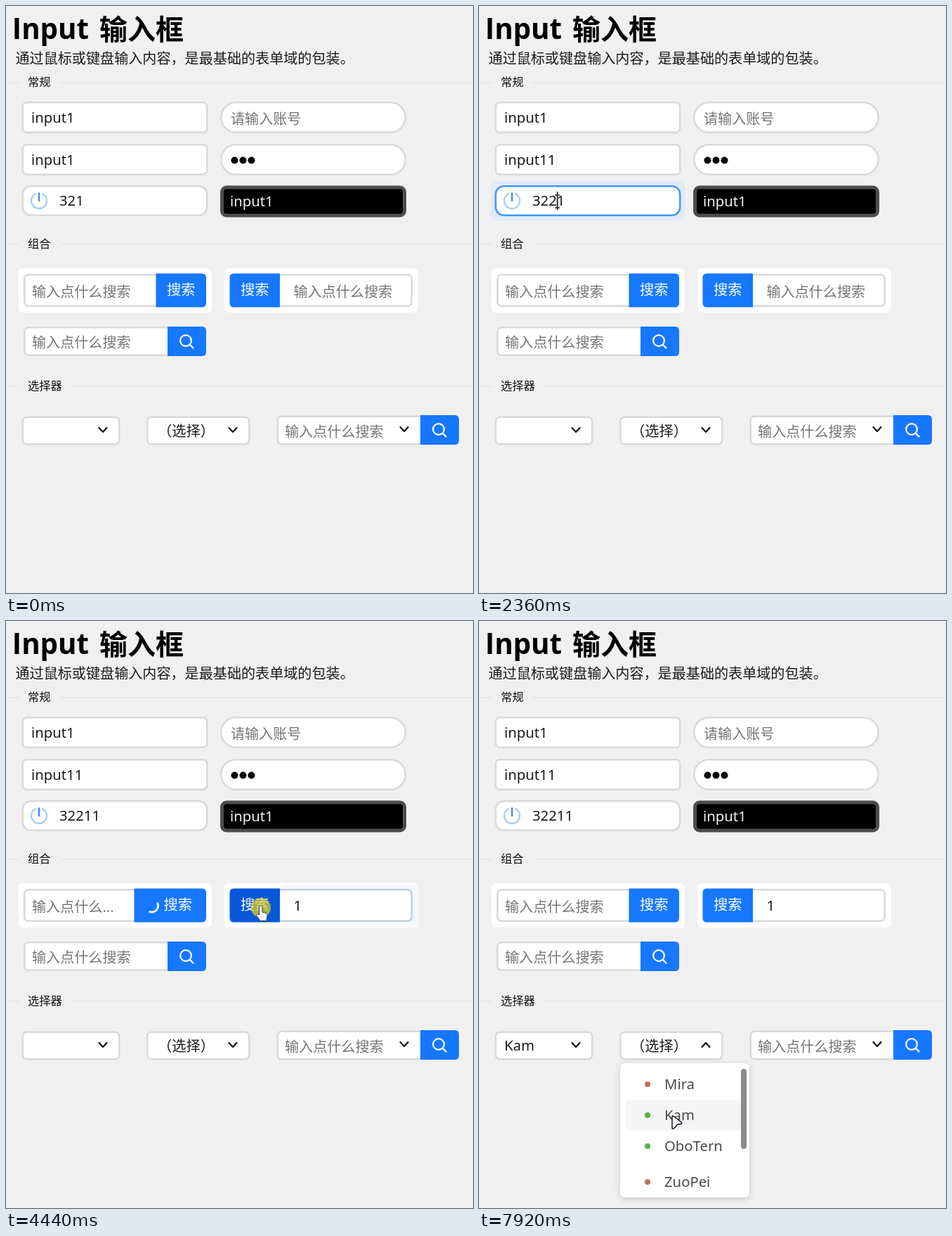
Animation of 665 by 835 pixels, one loop 8 s. Source, as an HTML page:

```html
<!DOCTYPE html>
<html lang="zh">
<head>
<meta charset="utf-8">
<style>
  html, body { margin: 0; height: 100%; overflow: hidden; background: #f0f0f0; }
  svg { display: block; width: 665px; height: 835px; }
  text { font-family: "Noto Sans", "Noto Sans CJK SC", "Noto Sans CJK", sans-serif; white-space: pre; }
  .title { font-family: "Open Sans", "Noto Sans CJK SC", "Noto Sans CJK", sans-serif; font-weight: 700; }
</style>
</head>
<body>
<svg id="stage" viewBox="0 0 665 835"></svg>
<script>
const LOOP = 8000, BLUE = '#1677ff', SKY = '#4096ff', GREY = '#d9d9d9', HINT = '输入点什么搜索';
const FIRST = 'Kam', NAMES = ['Mira', FIRST, 'OboTern', 'ZuoPei'], ROWS = [658, 702, 746, 797];
const stage = document.getElementById('stage');
const ruler = document.createElement('canvas').getContext('2d');
ruler.font = '20.3px "Noto Sans", sans-serif';

const clamp = v => Math.max(0, Math.min(1, v));
const ease = v => { v = clamp(v); return v * v * (3 - 2 * v); };
const mix = (a, b, k) => `color-mix(in srgb, ${b} ${(k * 100).toFixed(1)}%, ${a})`;
const pulse = (t, from, to, fade = 200) => clamp((t - from) / fade) * (1 - clamp((t - to) / fade));
const latest = (t, steps) => steps.filter(s => s[0] <= t).pop()[1];

// Pointer stops: time, x, y
const PATH = [
  [80, 300, 425], [560, 257, 155], [820, 400, 160], [1000, 400, 218], [1150, 390, 280],
  [1280, 230, 272], [1420, 182, 217], [1640, 160, 233], [1880, 150, 262], [2080, 110, 278],
  [2480, 112, 278], [2660, 369, 280], [2720, 369, 280], [2880, 184, 376], [2960, 182, 378],
  [3160, 250, 406], [3360, 252, 408], [3680, 450, 410], [3960, 448, 416], [4320, 363, 407],
  [4520, 363, 407], [5000, 130, 478], [5080, 130, 480], [5240, 134, 508], [5520, 140, 560],
  [5800, 96, 603], [6000, 95, 605], [6320, 89, 697], [6740, 89, 697], [7160, 290, 603],
  [7320, 289, 606], [7760, 270, 686], [7920, 275, 704]
];
const CLICKS = [1420, 2080, 2660, 3160, 3700, 4370, 5040, 5940, 6480, 7240];

function pointer(t) {
  const i = PATH.findIndex(p => p[0] > t);
  if (i === 0) return [-99, -99];
  if (i < 0) return PATH[PATH.length - 1].slice(1);
  const [t0, x0, y0] = PATH[i - 1], [t1, x1, y1] = PATH[i], k = ease((t - t0) / (t1 - t0));
  return [x0 + (x1 - x0) * k, y0 + (y1 - y0) * k];
}
const inside = ([px, py], [x, y, w, h], pad = 0) =>
  px >= x - pad && px <= x + w + pad && py >= y - pad && py <= y + h + pad;

// Share of the last 200 ms spent over the box, which gives the hover fade
function hover(t, box, pad = 0) {
  let hits = 0;
  for (let i = 0; i < 10; i++) hits += inside(pointer(t - i * 20), box, pad);
  return hits / 10;
}

const text = (x, y, s, fill = '#1a1a1a', size = 20.3, extra = '') =>
  `<text x="${x}" y="${y}" fill="${fill}" font-size="${size}" ${extra}>${s}</text>`;
const rect = (x, y, w, h, r, fill, extra = '') =>
  `<rect x="${x}" y="${y}" width="${w}" height="${h}" rx="${r}" fill="${fill}" ${extra}/>`;
const line = (d, color, width) =>
  `<path d="${d}" fill="none" stroke="${color}" stroke-width="${width}" stroke-linecap="round" stroke-linejoin="round"/>`;

function section(y, label, end) {
  return rect(0, y - 1, 19, 2, 0, '#e8e8e8') + rect(end, y - 1, 665 - end, 2, 0, '#e8e8e8') +
    text(31, y + 5, label, '#111', 16.3);
}

function field(t, f) {
  const [x, y, w, h] = f.box, sw = f.border || 2.5;
  const focus = f.focus ? pulse(t, ...f.focus) : 0;
  const active = f.focus && t >= f.focus[0] && t < f.focus[1];
  const lit = Math.max(focus * focus, hover(t, f.hit || f.box, 6));
  const value = f.value || '';
  const glow = f.glow || [x - 5.5, w + 11];
  let out = focus ? rect(glow[0], y - 6, glow[1], h + 12, 7, '#e2eaf8', `opacity="${focus}"`) : '';
  out += rect(x + sw / 2, y + sw / 2, w - sw, h - sw, (f.r || 7) - sw / 2, f.fill || '#fff',
    `stroke="${mix(f.edge || GREY, SKY, lit)}" stroke-width="${sw}"`);
  if (value) out += text(f.x, y + h / 2 + 7, value, f.color);
  else if (f.hint && !active) out += text(f.x, y + h / 2 + 9, f.hint, '#757575', 20.1);
  if (active && (t - (f.typed || f.focus[0])) % 1060 < 530) {
    const before = value.slice(0, value.length - (f.tail || 0));
    out += rect(f.x + ruler.measureText(before).width, y + h / 2 - 13, 1.5, 26, 0, f.color || '#111');
  }
  return out;
}

function button(t, [x, y, w, h], side, press = 1e9) {
  const r = 6, e = x + w, b = y + h;
  const shape = side === 'left'
    ? `M${e} ${y}H${x + r}Q${x} ${y} ${x} ${y + r}V${b - r}Q${x} ${b} ${x + r} ${b}H${e}Z`
    : `M${x} ${y}H${e - r}Q${e} ${y} ${e} ${y + r}V${b - r}Q${e} ${b} ${e - r} ${b}H${x}Z`;
  const pressed = t >= press && t < press + 150;
  return `<path d="${shape}" fill="${pressed ? '#0958d9' : mix(BLUE, SKY, hover(t, [x, y, w, h]))}"/>`;
}

const magnifier = (x, y) => `<circle cx="${x - 1}" cy="${y - 1}" r="7.9" fill="none" stroke="#fff" stroke-width="2.2"/>` +
  line(`M${x + 5} ${y + 5}l4.500 4.500`, '#fff', 2.4);

const chevron = (x, y, open = 0) => {
  const d = 3 * (1 - 2 * open);
  return line(`M${x - 5.5} ${y - d}L${x} ${y + d}L${x + 5.5} ${y - d}`, '#151515', 2.3);
};

const spinner = (t, x, y, k) => k <= 0 ? '' :
  `<g transform="translate(${x} ${y}) rotate(${42 + (t - 4440) * 360 / 960})" opacity="${k}">` +
  line('M3.8 -8.2A9 9 0 0 1 3.8 8.2', '#fff', 2.8) + '</g>';

function popup(x, w, h, open, content) {
  if (open <= 0) return '';
  return `<g transform="translate(0 629) scale(1 ${0.8 + 0.2 * open}) translate(0 -629)" opacity="${open}">` +
    rect(x, 629, w, h, 7, '#fff', 'filter="url(#shadow)"') + content + '</g>';
}

function list(t, x, w, textX, dots) {
  const at = pointer(t);
  return NAMES.map((name, i) => {
    const y = ROWS[i], row = [x + 8, y - 21, w - 20, 44];
    return (inside(at, row) ? rect(...row, 6, '#f5f5f5') : '') +
      (dots ? `<circle cx="${x + 39}" cy="${y + 1}" r="4" fill="${i % 3 ? '#52b43c' : '#c0705a'}"/>` : '') +
      text(textX, y + 7.5, name, '#4a4a4a');
  }).join('') + rect(x + w - 12, 637, 8, 114, 4, '#8c8c8c');
}

function drawPointer(t, buttons, inputs) {
  const at = pointer(t), [x, y] = at;
  if (x < 0) return '';
  const clicked = CLICKS.some(c => t >= c && t < c + 150);
  let shape;
  if (buttons.some(b => inside(at, b)))
    shape = '<path d="M-2.5 11V0a2.2 2.2 0 0 1 4.4 0V7l5.2 1.4q2.4.7 2 3.5l-1.2 7.6h-8.6l-5.5-7q-1-2.8 3.7-1.5z" fill="#fff" stroke="#333" stroke-width="1"/>';
  else if (inputs.some(b => inside(at, b, -8)))
    shape = line('M-3 -9H3M0 -9V9M-3 9H3', '#222', 1.4);
  else
    shape = '<path d="M0 1.5Q0-1 2 .5L13 9q1.5 2-1 2.4l-4.5.9-4.5 5.2Q0 20 0 16.500Z" fill="#fff" stroke="#111827" stroke-width="1.5"/>';
  return (clicked ? `<circle cx="${x}" cy="${y + 1}" r="14" fill="#dccf24" opacity=".73"/>` : '') +
    `<g transform="translate(${x} ${y})">${shape}</g>`;
}

function draw(t) {
  const load1 = pulse(t, 3220, 5100, 120), load2 = pulse(t, 4520, 6420, 120);
  const open1 = pulse(t, 5960, 6690, 180), open2 = clamp((t - 7280) / 180);
  const flip1 = ease((t - 5960) / 180) - ease((t - 6590) / 180);
  const left1 = 213.5 - 31 * load1, right2 = 390 + 31 * load2;
  const picked = t >= 6500;

  const go1 = [left1, 380.5, 285 - left1, 48], go2 = [318.5, 380.5, right2 - 318.5, 48];
  const go3 = [230, 456, 55, 42], go4 = [590, 582, 55, 42];

  const plain = [
    { box: [22.5, 136, 265, 45], x: 36, value: 'input1' },
    { box: [305, 136, 265, 45], r: 22.5, x: 320, hint: '请输入账号' },
    { box: [22.5, 196, 265, 45], x: 36, value: latest(t, [[0, 'input1'], [1900, 'input11']]), focus: [1420, 2080] },
    { box: [305, 196, 265, 45], r: 22.5 },
    { box: [22.5, 255, 265, 44], r: 13, x: 76, tail: 1, focus: [2080, 2660],
      value: latest(t, [[0, '321'], [2280, '3221'], [2440, '32211']]) },
    { box: [305, 255.5, 265, 45], r: 9, x: 319, value: 'input1', tail: 1, focus: [2660, 3160],
      border: 5, fill: '#000', edge: '#4d4d4d', color: '#f2f2f2' }
  ];
  const combo1 = { box: [25, 381, 250, 47], hit: [25, 381, left1 - 25, 47], x: 37,
    hint: load1 > 0.5 ? '输入点什么...' : HINT };
  const combo2 = { box: [375, 381, 204, 47], hit: [right2 + 6, 381, 573 - right2, 47], x: 409.5 + 31 * load2,
    hint: HINT, value: t >= 3960 ? '1' : '', focus: [3700, 4320], glow: [right2, 587 - right2] };
  const combo3 = { box: [25, 456, 230, 42], hit: [25, 456, 205, 42], x: 37, hint: HINT,
    focus: [5040, 5940], glow: [18, 212] };
  const select1 = { box: [22.5, 583.5, 140, 41], x: 36, value: picked ? FIRST : '', focus: [5940, 7240],
    typed: picked ? 6500 : 5940 };
  const select2 = { box: [200, 583.5, 147.5, 41] };
  const select3 = { box: [385.5, 582.5, 225, 42], hit: [385.5, 582.5, 204, 42], x: 397, hint: HINT };

  const inputs = [...plain, combo1, combo2, combo3, select1].map(f => f.hit || f.box);

  stage.innerHTML = `<defs><filter id="shadow" x="-20%" y="-20%" width="140%" height="140%">
      <feDropShadow dx="0" dy="2" stdDeviation="4" flood-opacity=".17"/></filter></defs>` +
    rect(0, 0, 665, 835, 0, '#f0f0f0') +
    text(8.8, 47, 'Input', '#000', 40.3, 'class="title"') + text(133, 48, '输入框', '#000', 40, 'class="title"') +
    text(13.5, 82, '通过鼠标或键盘输入内容，是最基础的表单域的包装。', '#1a1a1a', 20.1) +
    section(109, '常规', 76) + section(339, '组合', 78) + section(541, '选择器', 94) +

    plain.map(f => field(t, f)).join('') +
    [325.5, 337.5, 349.5].map(x => `<circle cx="${x}" cy="219.5" r="5" fill="#000"/>`).join('') +
    line('M42 267.200A11 11 0 1 0 52 267.200', '#a6cbfa', 2.3) + line('M47 266.500V277', '#3f8ef7', 2.5) +

    rect(17.5, 373, 275.500, 63, 6, '#fff') + field(t, combo1) + button(t, go1, 'right', 3120) +
    spinner(t, 207.5, 405, load1) + text(229 - 4.5 * load1, 411, '搜索', '#fff', 20.3) +

    rect(311, 373, 275.500, 63, 6, '#fff') + field(t, combo2) + button(t, go2, 'left', 4370) +
    spinner(t, 342, 405, load2) + text(334 + 26.5 * load2, 411, '搜索', '#fff', 20.3) +

    field(t, combo3) + button(t, go3, 'right') + magnifier(257, 477) +

    field(t, select1) + chevron(138, 603, flip1) +
    field(t, select2) + text(216, 611.5, '（选择）', '#1a1a1a', 20.3) + chevron(323, 603, ease(open2)) +
    field(t, select3) + chevron(567, 602) + button(t, go4, 'right') + magnifier(617, 603) +

    popup(23, 139, picked ? 60 : 191, open1, picked
      ? rect(31, 637, 123, 44, 6, '#e6f4ff') + text(50, 666, FIRST, '#1a1a1a', 20.3, 'font-weight="500"')
      : list(t, 23, 139, 50, false)) +
    popup(201, 184, 191, open2, list(t, 201, 184, 264, true)) +
    drawPointer(t, [go1, go2, go3, go4], inputs);
}

const start = performance.now();
function tick() {
  draw((performance.now() - start) % LOOP);
  requestAnimationFrame(tick);
}
tick();
</script>
</body>
</html>
```
